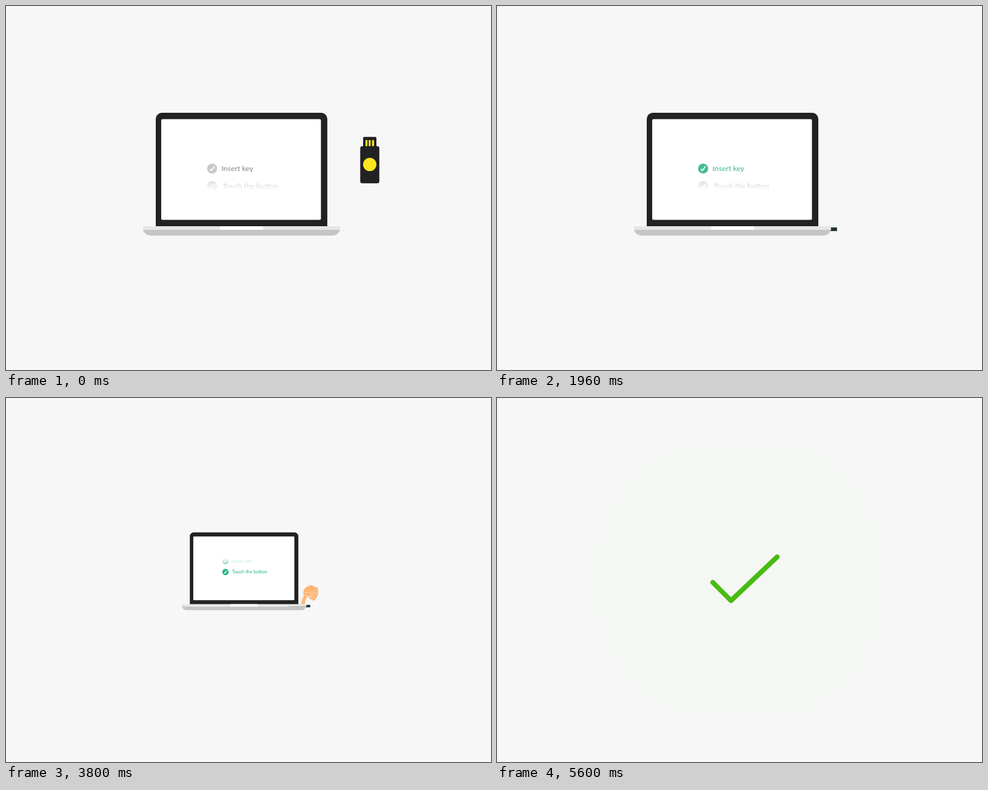
Write an HTML page with a canvas that moves like this. It is 800 px wide and 600 px high and loops after 7000 ms.

```html
<!DOCTYPE html>
<html lang="en">
<head>
<meta charset="utf-8">
<title>Security key sign-in</title>
<style>
  html, body { margin: 0; width: 100%; height: 100%; overflow: hidden; background: #f7f7f7; }
  canvas { display: block; width: 800px; height: 600px; }
</style>
</head>
<body>
<canvas id="stage" width="800" height="600"></canvas>
<script>
const ctx = document.getElementById('stage').getContext('2d');
const LOOP = 7000;
const DARK = '#222222', YELLOW = '#ffe51f';

const ramp = (t, from, to) => Math.min(1, Math.max(0, (t - from) / (to - from)));
const smooth = f => f * f * (3 - 2 * f);
const mix = (a, b, f) => a + (b - a) * f;

function layer(draw, alpha = 1) {
  if (alpha <= 0) return;
  ctx.save();
  ctx.globalAlpha *= alpha;
  draw();
  ctx.restore();
}

function box(x, y, w, h, color, radius = 0) {
  ctx.fillStyle = color;
  ctx.beginPath();
  ctx.roundRect(x, y, w, h, radius);
  ctx.fill();
}

function disc(x, y, r, color) {
  ctx.fillStyle = color;
  ctx.beginPath();
  ctx.arc(x, y, r, 0, Math.PI * 2);
  ctx.fill();
}

function fillPath(path, color) {
  ctx.fillStyle = color;
  ctx.fill(path);
}

// Security key, drawn around its centre
function keyShape(color, details) {
  box(-11, -38.3, 22, 18, color, [2, 2, 0, 0]);
  box(-15.7, -23, 31.5, 61.3, color, 3.5);
  layer(() => {
    for (const x of [-7, -1.7, 3.8]) box(x, -33, 3.2, 10, YELLOW);
    disc(0, 7.3, 11, YELLOW);
  }, details);
}

function drawKey(t) {
  const shrink = smooth(ramp(t, 140, 660));
  const turn = ramp(t, 520, 840);
  const drop = smooth(ramp(t, 850, 1160));
  const pullBack = smooth(ramp(t, 1420, 1580));
  const push = ramp(t, 1580, 1760) ** 2;
  const x = mix(600, 592.8, shrink) - drop + 11.5 * pullBack - 70.5 * push;
  const y = 254 + 42 * turn ** 2 + 72 * drop;
  const squash = mix(mix(1, 0.8, shrink), 0.27, drop);
  const size = mix(1, 0.73, shrink);
  layer(() => {
    ctx.translate(x, y);
    ctx.scale(1, squash);
    ctx.rotate(-Math.PI / 2 * turn ** 1.6);
    ctx.scale(size, size);
    keyShape(DARK, 1 - ramp(drop, 0.6, 1));
    layer(() => keyShape('#263238', 0), drop);
  });
}

const tick = new Path2D('M-3.7 .6 L-1.2 3.4 L3.9 -3.7');

function step(label, textX, y, green, done) {
  const paint = (icon, text) => {
    disc(340, y, 8.3, icon);
    ctx.fillStyle = text;
    ctx.fillText(label, textX, y + 4.2);
  };
  layer(() => paint('#c8c8c8', '#8f8f8f'), 1 - done);
  layer(() => paint(green, green), done);
  layer(() => {
    ctx.translate(340, y);
    ctx.strokeStyle = '#fff';
    ctx.lineWidth = 1.8;
    ctx.stroke(tick);
  });
}

function veil(y, height, solidY, clearY, alpha) {
  const fade = ctx.createLinearGradient(0, solidY, 0, clearY);
  fade.addColorStop(0, 'rgba(255,255,255,1)');
  fade.addColorStop(1, 'rgba(255,255,255,0)');
  layer(() => box(325, y, 135, height, fade), alpha);
}

function drawScreen(t) {
  box(247, 176, 283, 188, DARK, [10, 10, 0, 0]);
  box(256, 186.5, 263.5, 166, '#fff', 2);
  ctx.font = '500 12.2px Lato, "Open Sans", sans-serif';
  const scroll = smooth(ramp(t, 2260, 2660));
  step('Insert key', 355.5, 268 - 17.5 * scroll, '#44bc95', ramp(t, 1740, 1960));
  step('Touch the button', 357, 297 - 18 * scroll, '#2ab68a', ramp(t, 2660, 2960));
  veil(238, 30, 243, 268, scroll);
  veil(278, 32, 304, 278, 1 - scroll);
}

const lowerBase = new Path2D('M226 369H551Q548 378.5 537 378.5H240Q229 378.5 226 369Z');

function drawBase() {
  fillPath(lowerBase, '#c5c5c5');
  box(226, 363, 325, 6, '#e6e6e6', [1, 1, 0, 0]);
  box(353, 363, 71, 6, '#fff');
}

const hand = new Path2D('M562 312.5L582 321.5L580.5 327Q583 333 581 338Q580.5 342 579 344L573 352Q568 356 564 351Q558 350 558 345L556 343Q550 346 548 355L547 364H537Q538 350 545 341Q542 338 543.5 328Q548 318 556 316Z');
const fingerLines = new Path2D('M546 333Q551 334 556 333Q565 333 567 338Q566 343 557 342L546 341M567 338Q568 331 574 331Q580 333 576 340Q571 346 564 351M558 346Q562 343 567 342');

function drawHand(t) {
  const enter = smooth(ramp(t, 2260, 2600));
  layer(() => {
    ctx.translate(3 * (1 - enter), -10 * (1 - enter));
    fillPath(hand, '#ffb676');
    ctx.strokeStyle = '#fff3e6';
    ctx.lineWidth = 0.9;
    ctx.stroke(fingerLines);
  }, enter);
}

// x, y, height, width, tilt
const sparks = [
  [558, 231, 13, 4, 0], [530, 267, 12, 5, 0], [553, 271, 10, 5, 0.1],
  [550.5, 285, 6, 5, 0], [544, 297, 12, 8, -0.4], [547.5, 307, 13, 5, 0],
  [556.5, 304.5, 6, 4.5, 0], [524, 314, 7, 5, 0], [536.5, 318, 9, 5.5, 0],
  [539.5, 330, 11, 6, 0], [546, 325, 6, 5, 0.3], [543, 342, 5, 4, 0]
];

function drawSparks(t) {
  if (t < 2980) return;
  const age = (t - 2980) / 280;
  const travel = (1 - Math.exp(-age)) / (1 - Math.exp(-1));
  layer(() => {
    for (const [x, y, h, w, tilt] of sparks) layer(() => {
      ctx.translate(mix(545, x, travel), mix(358, y, travel));
      ctx.rotate(tilt);
      ctx.scale(w / 5, h / 12);
      fillPath(bang, '#efcc0b');
    });
  }, 1 - ramp(t, 3320, 3600));
}
const bang = new Path2D('M-2.5 -4Q-2 -6 0 -6Q2 -6 2.5 -4Q2.4 -1 1.2 2.4H-1.2Q-2.4 -1 -2.5 -4ZM-1.5 3.2H1.5V6H-1.5Z');

function drawLaptop(t) {
  const size = 1 - ramp(t, 3600, 3900) ** 2.5;
  if (size <= 0) return;
  layer(() => {
    ctx.translate(400, 300);
    ctx.scale(size, size);
    ctx.translate(-400, -300);
    drawKey(t);
    drawScreen(t);
    drawSparks(t);
    drawHand(t);
    drawBase();
  });
}

function pulse(r, alpha) {
  layer(() => disc(401, 299, r, 'rgb(24,214,40)'), alpha);
}

function widePulse(t, start) {
  const f = ramp(t, start, start + 638);
  pulse(30 + 220 * f, 0.0135 + 0.1865 * (1 - f) ** 1.5);
}

function drawSuccess(t) {
  if (t < 3880) return;
  layer(() => {
    ctx.beginPath();
    ctx.rect(100, 75, 600, 450);
    ctx.clip();
    if (t > 4060) {
      const f = ramp(t, 4060, 4498);
      pulse(30 + 100 * f, 0.2 * (1 - f) ** 1.23);
    }
    if (t > 4509 && t < 5147) widePulse(t, 4509);
    if (t < 4962) pulse(30 * smooth(ramp(t, 3880, 4060)), 0.2);
    else widePulse(t, 4962);
  });
  const drawn = smooth(ramp(t, 3900, 4260));
  if (drawn > 0) layer(() => {
    ctx.strokeStyle = '#48bb12';
    ctx.lineWidth = 8;
    ctx.lineCap = ctx.lineJoin = 'round';
    ctx.setLineDash([148 * drawn, 300]);
    ctx.stroke(new Path2D('M356 304L386 334L462 262'));
  });
}

function render(t) {
  ctx.fillStyle = '#f7f7f7';
  ctx.fillRect(0, 0, 800, 600);
  drawLaptop(t);
  drawSuccess(t);
}

const startTime = performance.now();
function frame() {
  render((performance.now() - startTime) % LOOP);
  requestAnimationFrame(frame);
}
frame();
</script>
</body>
</html>
```
